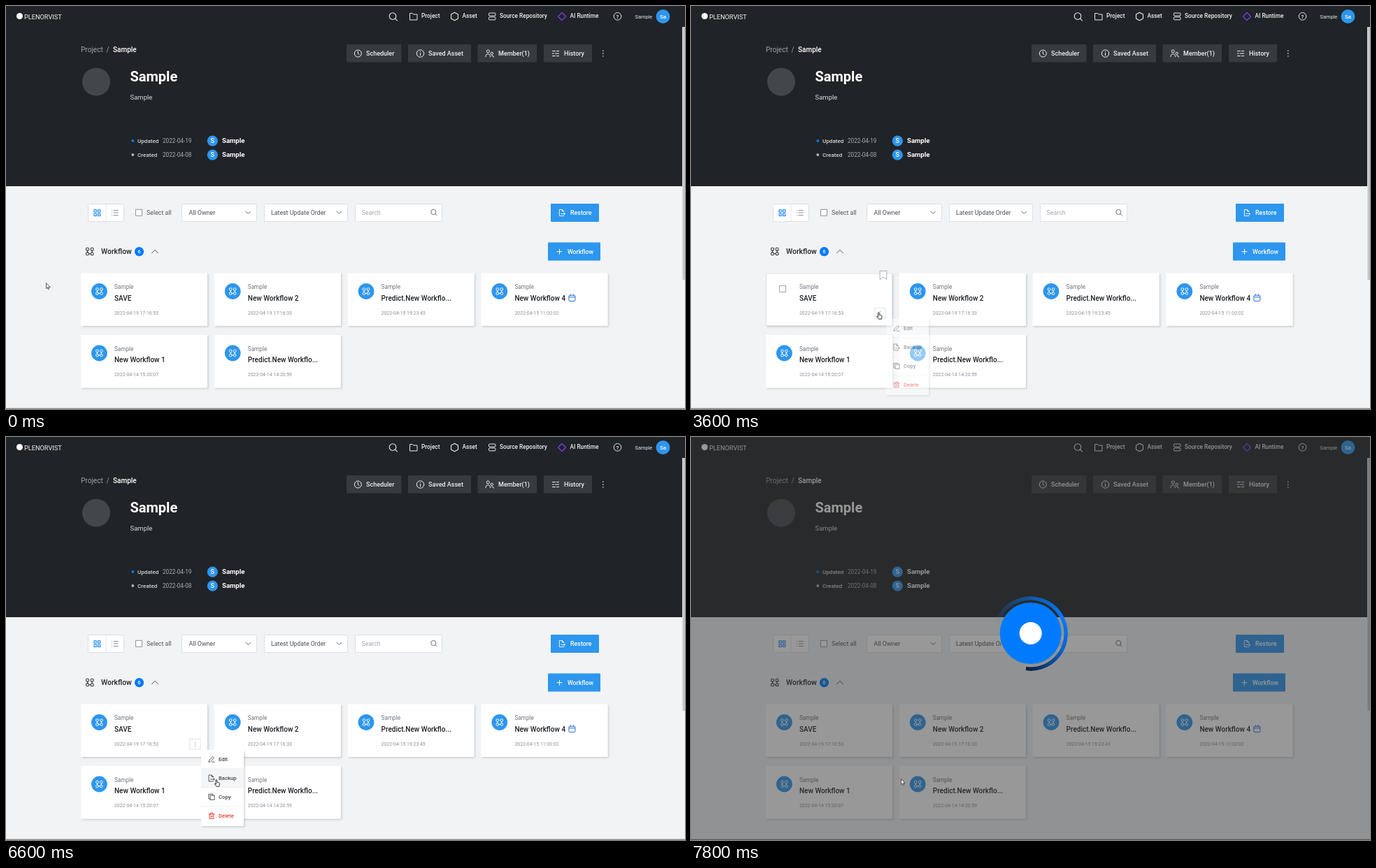
These frames come from a looping animation (971 by 577 pixels, 8 s). An HTML page:

```html
<!DOCTYPE html>
<html lang="en">
<head>
<meta charset="utf-8">
<title>Project workflows</title>
<style>
  html, body { margin: 0; width: 100%; height: 100%; overflow: hidden; background: #f1f3f5; }
  svg { position: absolute; left: 0; top: 0; display: block; }
  text { font-family: Roboto, Arial, sans-serif; white-space: pre; }
  #ring {
    position: absolute; left: 432px; top: 227.5px; width: 107px; height: 107px; border-radius: 50%;
    background: conic-gradient(from 95deg, rgba(0,123,255,0) 0deg, #007bff 140deg, #0763c9 195deg, #0c1f3a 265deg, transparent 265.5deg);
    -webkit-mask: radial-gradient(circle at center, transparent 47.5px, #000 48.3px);
    mask: radial-gradient(circle at center, transparent 47.5px, #000 48.3px);
  }
</style>
</head>
<body>
<svg id="stage" width="971" height="577" viewBox="0 0 971 577"></svg>
<div id="ring"></div>
<svg id="top" width="971" height="577" viewBox="0 0 971 577"></svg>
<script>
const BLUE = '#2d96ee', VIVID = '#007bff', INK = '#202327', USER = 'Sample';
const $ = id => document.getElementById(id);

// y is the middle of the capitals
const text = (s, x, y, size, fill, weight = 400, anchor = 'start') =>
  `<text x="${x}" y="${y + size * 0.355}" font-size="${size}" fill="${fill}" font-weight="${weight}" text-anchor="${anchor}">${s}</text>`;
const rect = (x, y, w, h, fill, stroke = 'none', r = 0, sw = 1) =>
  `<rect x="${x}" y="${y}" width="${w}" height="${h}" rx="${r}" fill="${fill}" stroke="${stroke}" stroke-width="${sw}"/>`;
const circle = (x, y, r, fill, stroke = 'none', sw = 1) =>
  `<circle cx="${x}" cy="${y}" r="${r}" fill="${fill}" stroke="${stroke}" stroke-width="${sw}"/>`;
const line = (d, stroke, sw = 1, fill = 'none') =>
  `<path d="${d}" fill="${fill}" stroke="${stroke}" stroke-width="${sw}" stroke-linecap="round" stroke-linejoin="round"/>`;
const group = (body, attrs) => `<g ${attrs}>${body}</g>`;
const at = (x, y, body) => group(body, `transform="translate(${x} ${y})"`);
const dots = (x, y, gap, r, fill) => [-1, 0, 1].map(i => circle(x, y + i * gap, r, fill)).join('');
const box = (x, w) => rect(x + 0.5, 283.5, w - 1, 25, '#fff', '#dcdfe3', 1);
const chevron = (x, y, w, h, color) => line(`M${x - w} ${y - h}L${x} ${y + h}L${x + w} ${y - h}`, color);
const magnifier = (x, y, r, color, sw) => circle(x, y, r, 'none', color, sw) +
  line(`M${x + r * .7} ${y + r * .7}l${r * .65} ${r * .65}`, color, sw);
const flowIcon = (x, y, s, color) => at(x, y, group(
  rect(-5, -5, 3.7, 3.7, 'none', color, 1.2) + rect(1.3, -5, 3.7, 3.7, 'none', color, 1.2) +
  rect(-5, 1.3, 3.7, 3.7, 'none', color, 1.2) + circle(3.15, 3.15, 1.9, 'none', color) +
  line('M-3.1 -1.3V1.3M3.1 -1.3V1.3M-1.3 3.1H1.3', color), `transform="scale(${s})"`));
const sheet = (x, y, color) => at(x, y,
  line('M2.5 -1.5V-2L0 -4.5H-4V4.5H2.5M0 -4.5V-2H2.5M-1.5 1.5H4.2M2.8 0L4.3 1.5L2.8 3', color, .9));

function navBar() {
  const items = [['Project', 594], ['Asset', 652.5], ['Source Repository', 706], ['AI Runtime', 806.5]];
  return circle(19.5, 14.5, 4.5, '#fff') + text('PLENORVIST', 26, 15.7, 9.2, '#f4f5f6') +
    magnifier(553, 14.5, 4.8, '#e8eaec', 1.1) +
    line('M577.5 19.5V10.5H581.5L583 12H588V19.5Z', '#e8eaec') +
    line('M641.5 9.2l5 2.9v5.8l-5 2.9l-5 -2.9v-5.8Z', '#e8eaec', 1.1) +
    rect(690.5, 10, 9.5, 4, 'none', '#e8eaec', 1) + rect(690.5, 15.8, 9.5, 4, 'none', '#e8eaec', 1) +
    line('M795 9.5l5.5 5.5l-5.5 5.5l-5.5 -5.5Z', '#7a3ff0', 1.2) +
    items.map(([s, x]) => text(s, x, 14.5, 8.3, '#eef0f2', 500)).join('') +
    circle(874.5, 14.8, 5.3, 'none', '#e8eaec') + text('?', 874.5, 14.9, 8, '#e8eaec', 500, 'middle') +
    text(USER, 899.5, 15, 7.4, '#e8eaec') + circle(939.5, 15, 10, BLUE) +
    text(USER.slice(0, 2), 939.5, 15, 8, '#fff', 500, 'middle');
}

function header() {
  const buttons = [['Scheduler', 487, 78.5, 515], ['Saved Asset', 575, 90, 604], ['Member(1)', 674.5, 84.5, 704], ['History', 769, 69, 798]];
  const white = '#eef0f2';
  const row = (label, date, y, dot) => circle(181.3, y, 1.9, dot) + text(label, 188, y, 8.1, '#d3d6d9', 500) +
    text(date, 224, y, 8.2, '#a9adb2') + circle(295.3, y + .2, 7.6, BLUE) +
    text(USER[0], 295.3, y + .3, 9, '#fff', 500, 'middle') + text(USER, 309, y, 9.6, '#fff', 700);
  return text('Project', 107, 62.7, 10.1, '#9ea2a7') + text('/', 143.5, 62.7, 10, '#9ea2a7') +
    text(USER, 153, 62.7, 10, '#fff', 500) +
    buttons.map(([s, x, w, tx]) => rect(x, 55, w, 25.5, '#373b40', 'none', 1) + text(s, tx, 67.8, 9, white, 500)).join('') +
    circle(503.3, 68, 5, 'none', white) + line('M503.3 65V68.2L505.2 69.5', white) +
    circle(592.5, 68, 5.2, 'none', white) + line('M592.5 67.5V70.5M592.5 65.3v.1', white, 1.1) +
    circle(689.3, 64.8, 2, 'none', white) + line('M686 72.7q0 -4 3.3 -4t3.3 4', white) +
    circle(694.8, 67.8, 1.7, 'none', white) + line('M694.5 71q3 -.3 3 2.2', white) +
    line('M781.5 64.5h4m2 0h3M781.5 68h2m2 0h5M781.5 71.5h4m2 0h3', white) +
    dots(853.8, 68, 3.8, .9, '#b5b8bc') +
    circle(129, 108.5, 20, '#43474c') + text(USER, 177.5, 100.8, 20, '#fff', 700) +
    text(USER, 177.5, 131, 9.5, '#d9dcdf') +
    row('Updated', '2022-04-19', 193, VIVID) + row('Created', '2022-04-08', 213, '#b3b6ba');
}

function toolbar() {
  const grid = [126, 131.5].map(x => [291.8, 297.2].map(y => rect(x, y, 3.3, 3.3, 'none', VIVID)).join('')).join('');
  return box(117, 52) + line('M143 284V308', '#e4e7ea') + grid +
    [292.5, 296, 299.5].map(y => line(`M151.5 ${y}h.2M154 ${y}h6.3`, '#8b9097')).join('') +
    rect(185.5, 291.3, 9, 9, '#fff', '#8f949a') + text('Select all', 201, 296, 8.9, '#53585e') +
    box(251, 108) + text('All Owner', 261.5, 296, 8.9, '#4a4f55') + chevron(346.3, 295.8, 3.3, 1.7, '#666b71') +
    box(369, 120) + text('Latest Update Order', 379, 296, 8.8, '#4a4f55') + chevron(476.3, 295.8, 3.3, 1.7, '#666b71') +
    box(499, 125) + text('Search', 508.5, 296, 8.9, '#a3a8ae') + magnifier(611.3, 295, 3.6, '#6b7076', 1) +
    rect(779, 283, 69, 26, BLUE, 'none', 1) + sheet(795.3, 296, '#fff') + text('Restore', 807, 296.2, 8.9, '#fff', 500) +
    flowIcon(119.8, 351.5, 1.05, '#33383d') + text('Workflow', 136, 351.6, 10.4, '#202428', 500) +
    circle(190.5, 351.7, 6.6, VIVID) + text('6', 190.5, 351.8, 7.5, '#fff', 500, 'middle') +
    chevron(213, 351.5, 4.5, -2.2, '#555a60') +
    rect(775, 338.5, 75, 26, BLUE, 'none', 1) + line('M788 351.7h7M791.5 348.2v7', '#fff') +
    text('Workflow', 803, 351.6, 8.8, '#fff', 500);
}

const cards = [
  ['SAVE', '2022-04-19 17:16:53'], ['New Workflow 2', '2022-04-19 17:16:33'],
  ['Predict.New Workflo...', '2022-04-15 19:23:45'], ['New Workflow 4', '2022-04-15 11:00:02'],
  ['New Workflow 1', '2022-04-14 15:20:07'], ['Predict.New Workflo...', '2022-04-14 14:20:59']
].map(([name, date], i) => ({ name, date, x: 107 + i % 4 * 190.8, y: i < 4 ? 382.5 : 471 }));

const dotButton = rect(156, 50, 15, 14.5, '#fff', '#dfe2e5') + dots(163.5, 57.2, 2.7, .7, '#9a9fa5');
function cardView({ name, date, x, y }, i) {
  return at(x, y, group(rect(0, 0, 181, 75.5, '#fff'), 'filter="url(#shade)"') +
    text(USER, 48, 19.7, 8.2, '#6f757b') + text(name, 48, 35.6, 10, '#1d2125', 500) +
    text(date, 48, 57, 6.9, '#8b9097') +
    group(circle(26.4, 26, 11.4, BLUE) + flowIcon(26.4, 26, .95, '#fff'), `id="icon${i}"`) +
    group(rect(.5, .5, 180, 74.5, 'none', '#dfe2e6') + rect(19.5, 18, 9, 9, '#fff', '#a2a7ad') +
      line('M163.5 -3.2H172.8V9L168.1 5.5L163.5 9Z', '#a9adb2', 1, '#fff'), `id="hover${i}"`) +
    group(dotButton, `id="more${i}"`) +
    (i === 3 ? rect(125.5, 31.7, 9, 8.3, 'none', '#2d72e0', 1) + line('M125.5 34.3h9M128 30.3v2M132 30.3v2', '#2d72e0') : ''));
}

function menu() {
  const ink = '#43484e', red = '#e8392f';
  const labels = ['Edit', 'Backup', 'Copy', 'Delete'];
  return group(rect(279, 448, 61, 109, '#fff'), 'filter="url(#shade)"') +
    `<rect id="row" x="279" width="61" height="27" fill="#f4f5f7"/>` +
    [475, 502, 529].map(y => line(`M279 ${y}H340`, '#eceef0', .8)).join('') +
    labels.map((s, i) => text(s, 304, 461.5 + i * 27, 7.7, i === 3 ? red : ink, 500)).join('') +
    line('M290 465.2l.7 -2.6l5 -5l1.8 1.8l-5 5ZM294.5 465.3h3.5', ink, .9) + sheet(294, 488.5, ink) +
    line('M292 518H289.8V511.3H296V513', ink, .9) + rect(292, 513.2, 6, 6.2, 'none', ink, 0, .9) +
    line('M290 540h8M292.3 540v-1.6h3.4v1.6M291 540v6.5h6V540M293.1 542v2.6M294.9 542v2.6', red, .9);
}

$('stage').innerHTML =
  `<defs><filter id="shade" x="-10%" y="-10%" width="125%" height="130%"><feDropShadow dx="1.5" dy="1.5" stdDeviation="1.3" flood-color="#000" flood-opacity=".16"/></filter></defs>` +
  rect(0, 0, 971, 577, '#f1f3f5') + rect(0, 0, 967, 258, INK) + rect(967, 0, 4, 30, INK) +
  rect(967.5, 30, 3.5, 362, '#c3c5c8') + rect(0, 575.7, 971, 1.3, '#858789') +
  navBar() + header() + toolbar() + cards.map(cardView).join('') + group(menu(), 'id="menu"') +
  `<rect id="veil" width="971" height="577" fill="#333"/>`;

$('top').innerHTML =
  group(circle(485.7, 281, 44, VIVID) + circle(485.7, 281, 16, '#fff'), 'id="disc"') +
  group(line('M0 0V7.6L1.8 6L3 8.8L4.2 8.3L3 5.6H5.3Z', '#333', .8, '#fff'), 'id="arrow"') +
  group(line('M2.3 1q.8 -1 1.6 0V4.2l3 .8q1 .4 .9 1.6L7.1 10.3H3.2L.4 6.7q.2 -1.2 1.9 .1Z', '#222', .9, '#fff'), 'id="hand"');

// Pointer tip: time, x, y
const path = [
  [1000, 57.5, 397], [2200, 249, 408], [2400, 262, 409], [3400, 268, 438], [4000, 268, 438],
  [4400, 301, 444], [4800, 300, 463], [5200, 300.5, 489], [5400, 301, 490.5], [5600, 300.5, 490]
];
function pointer(t) {
  const next = path.findIndex(p => p[0] > t);
  if (next < 0) return path[path.length - 1].slice(1);
  if (next === 0) return path[0].slice(1);
  const a = path[next - 1], b = path[next];
  let k = (t - a[0]) / (b[0] - a[0]);
  if (next === 1) k = k * k * (3 - 2 * k);
  return [1, 2].map(i => a[i] + (b[i] - a[i]) * k);
}

const show = (id, on) => $(id).setAttribute('visibility', on ? 'visible' : 'hidden');
const fade = (id, value) => $(id).setAttribute('opacity', value);

function render(time) {
  const t = Math.floor(time / 200) * 200;
  const [x, y] = pointer(t);
  const loading = t >= 6800, open = t >= 3600 && !loading;
  const overMenu = open && x >= 279 && y >= 448;
  cards.forEach((c, i) => {
    const over = !loading && !overMenu && x >= c.x && x < c.x + 181 && y >= c.y && y < c.y + 75.5;
    show('icon' + i, !over);
    show('hover' + i, over);
    show('more' + i, over || (open && i === 0));
  });
  fade('menu', t < 3600 || t >= 7000 ? 0 : t === 3600 || loading ? .5 : 1);
  show('row', overMenu || t === 6800);
  $('row').setAttribute('y', y < 475 ? 448 : 475);
  fade('veil', !loading ? 0 : t === 6800 ? .2 : .5);
  show('disc', loading);
  $('ring').style.visibility = loading ? 'visible' : 'hidden';
  $('ring').style.transform = `rotate(${7 + (t - 6800) * .18}deg)`;
  const hand = !loading && x > 107;
  show('hand', hand);
  show('arrow', !hand);
  $('hand').setAttribute('transform', `translate(${x - 2.7} ${y})`);
  $('arrow').setAttribute('transform', `translate(${x} ${y})`);
}

const start = performance.now();
function tick() {
  render((performance.now() - start) % 8000);
  requestAnimationFrame(tick);
}
tick();
</script>
</body>
</html>
```
